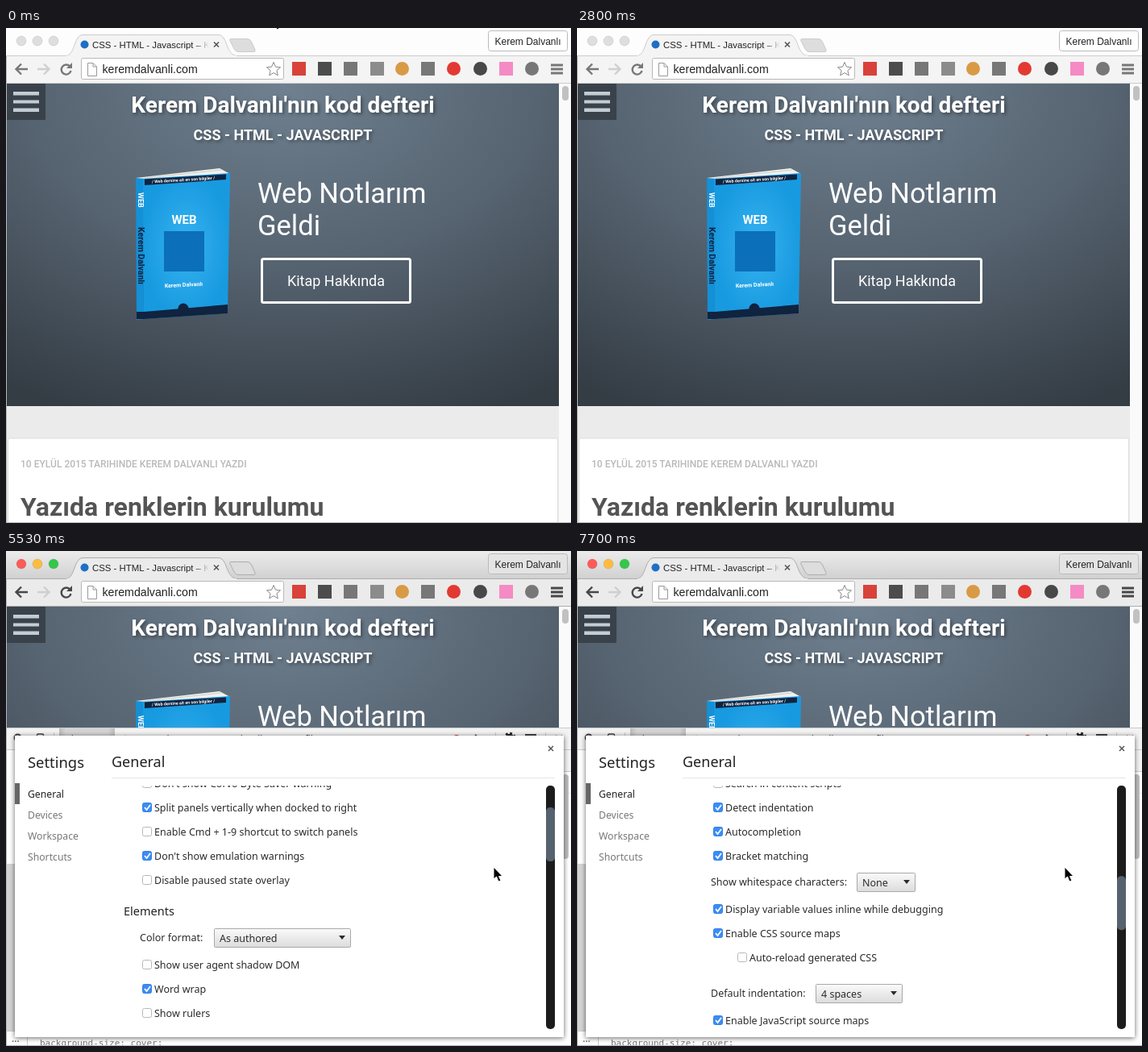
Animation, 701 px wide and 614 px high, one loop 8 s. Source, as an HTML page:

```html
<!DOCTYPE html>
<html lang="tr">
<head>
<meta charset="utf-8">
<title>Settings walkthrough</title>
<style>
html, body { margin: 0; width: 100%; height: 100%; overflow: hidden; background: #fff }
svg { display: block; --dim: #787878; --edge: #ccc; --bar: #f4f4f4; --btn: #fff }
svg.on { --dim: #484848; --edge: #adadad; --bar: #ebebeb; --btn: #e4e4e4 }
svg.on .red { fill: #fc5b57 } svg.on .yel { fill: #fdbc40 } svg.on .grn { fill: #34c84a }
text { white-space: pre }
.ui { font: 12px "Liberation Sans", Arial, sans-serif }
.page { font-family: Roboto, sans-serif; fill: #fff }
.dev { font: 12.2px "Noto Sans", sans-serif; fill: #444 }
.opt { font: 12.5px "Noto Sans", sans-serif; fill: #2b2b2b }
.mono { font: 11px "DejaVu Sans Mono", monospace }
.menu { font: 14.35px "Liberation Sans", Arial, sans-serif; fill: #2a2a2a }
.line { fill: none; stroke: var(--dim); stroke-width: 2.4 }
.shade { filter: drop-shadow(2px 2px 2px #0006) }
</style>
</head>
<body>
<svg id="stage" width="701" height="614" viewBox="0 0 701 614">
<defs>
  <radialGradient id="sky" gradientUnits="userSpaceOnUse" cx="0" cy="0" r="1" gradientTransform="translate(345 72) scale(640 440)">
    <stop stop-color="#6f8090"/><stop offset=".5" stop-color="#566370"/><stop offset="1" stop-color="#343c44"/>
  </radialGradient>
  <radialGradient id="cover"><stop stop-color="#36b2f0"/><stop offset="1" stop-color="#189ae0"/></radialGradient>
  <linearGradient id="strip" x2="0" y2="1"><stop stop-color="#ececec"/><stop offset="1" stop-color="#d0d0d0"/></linearGradient>
  <linearGradient id="glass" gradientUnits="userSpaceOnUse" x1="0" x2="0" y1="400" y2="614">
    <stop stop-color="#b9c2c8"/><stop offset=".32" stop-color="#ced3d6"/><stop offset=".48" stop-color="#e2e4e5"/><stop offset=".51" stop-color="#f5f5f5"/>
  </linearGradient>
  <linearGradient id="fade" gradientUnits="userSpaceOnUse" x1="234" x2="252" y1="0" y2="0">
    <stop stop-color="#222"/><stop offset="1" stop-color="#222" stop-opacity="0"/>
  </linearGradient>
  <linearGradient id="knob" x2="0" y2="1"><stop stop-color="#fafafa"/><stop offset="1" stop-color="#dcdcdc"/></linearGradient>
  <linearGradient id="picked" x2="1" y2="0"><stop stop-color="#bbb"/><stop offset=".12" stop-color="#d4d4d4"/><stop offset=".88" stop-color="#d4d4d4"/><stop offset="1" stop-color="#bbb"/></linearGradient>
  <clipPath id="view"><path d="M140 291H668V593H140Z"/></clipPath>
</defs>

<!-- web page -->
<path fill="#ebebeb" d="M0 69H701V614H0Z"/>
<path fill="url(#sky)" d="M1 69H686V469H1Z"/>
<path fill="#fff" stroke="#dcdcdc" d="M2.5 620V511q0-2 2-2H682.500q2 0 2 2V620"/>
<path fill="#39424b" d="M1 69H49V114H1Z"/>
<path fill="#c3ccd3" d="M9 79H41v4.500H9ZM9 89.500H41v4H9ZM9 99.500H41v4.500H9Z"/>
<g class="page">
  <g class="shade" text-anchor="middle" font-weight="700">
    <text x="343.500" y="105" font-size="28">Kerem Dalvanlı'nın kod defteri</text>
    <text x="343.500" y="139" font-size="18">CSS - HTML - JAVASCRIPT</text>
  </g>
  <text x="312" y="217" font-size="34.500">Web Notlarım</text>
  <text x="312" y="257" font-size="34.500">Geldi</text>
  <rect x="317.500" y="286.500" width="184" height="54" rx="2" fill="none" stroke="#fff" stroke-width="3"/>
  <text x="409.500" y="320" font-size="18" text-anchor="middle">Kitap Hakkında</text>
  <text x="18" y="545" font-size="12" font-weight="500" style="fill:#b9b9b9">10 EYLÜL 2015 TARIHINDE KEREM DALVANLI YAZDI</text>
  <text x="18" y="605" font-size="32" font-weight="700" style="fill:#545454">Yazıda renklerin kurulumu</text>
</g>

<!-- book -->
<path fill="#f1f1ee" d="M161 186L265 174L278 181L169 189Z"/>
<path fill="none" stroke="#bdbdb8" stroke-width=".7" d="M164 187L267 176"/>
<path fill="url(#cover)" d="M169 187L278 180L275 354L171 361Z"/>
<path fill="#1490d6" d="M161 186L170 187L171 361L162 362Z"/>
<path fill="#10233f" d="M172 187.500L273 181.500V188L172 195ZM162 352L171 352L275 343V354L171 361H162Z"/>
<circle cx="220" cy="348" r="6.500" fill="#10233f"/>
<rect x="196" y="252" width="50" height="50" fill="#0b6fba"/>
<g class="page" font-weight="700">
  <text x="181" y="192.500" font-size="5.300" transform="rotate(-3.500 181 192)">/ Web dersine ait en son bilgiler /</text>
  <text x="221" y="243" font-size="15" text-anchor="middle">WEB</text>
  <text x="220.500" y="321" font-size="7" text-anchor="middle" transform="rotate(-3 220 320)">Kerem Dalvanlı</text>
  <text font-size="9" transform="translate(163.500 204) rotate(90)">WEB</text>
  <text font-size="10.500" transform="translate(163.500 247) rotate(90)" style="fill:#10233f">Kerem Dalvanlı</text>
</g>

<!-- element highlight -->
<g id="glow">
  <path fill="#6fa8dc" opacity=".66" d="M1 69H686V219H1Z"/>
  <rect x="3.500" y="77.500" width="238" height="17" fill="#ffffc2" stroke="#9c9c86"/>
  <text class="mono" x="6" y="89"><tspan fill="#881280">div</tspan><tspan fill="#994500">.header-title-wrap</tspan> 685<tspan fill="#888">px ×</tspan> 400<tspan fill="#888">px</tspan></text>
</g>
<path fill="#fafafa" d="M686 69H701V614H686Z"/>
<rect x="690" y="72" width="8" height="18" rx="4" fill="#c1c1c1"/>

<!-- browser frame -->
<path fill="#fdfdfd" d="M0 0H701V35H0Z"/>
<path id="live" fill="url(#strip)" d="M0 0H701V35H0Z"/>
<path style="fill:var(--bar)" d="M0 34H701V68H0Z"/>
<path style="stroke:var(--edge)" fill="none" d="M0 34.500H701M0 68.500H701"/>
<path style="fill:var(--bar);stroke:var(--edge)" d="M74 34.500C80 34 82 29 85 21Q89 8.500 95 8.500H264Q270 8.500 274 21C277 29 280 34 287 34.500"/>
<path style="fill:var(--bar)" d="M75 34H286V36H75Z"/>
<path fill="#ddd" style="stroke:var(--edge)" d="M279 13.500H300Q303 13.500 305 18L309 27Q310 29.500 307 29.500H288Q285 29.500 283 26L278 16Q277 13.500 279 13.500Z"/>
<g fill="#dedede" stroke="#0002" stroke-width=".7"><circle class="red" cx="19" cy="16" r="6"/><circle class="yel" cx="39" cy="16" r="6"/><circle class="grn" cx="59" cy="16" r="6"/></g>
<circle cx="97.500" cy="20.500" r="5" fill="#1f6fc4"/>
<text class="ui" x="107" y="25" fill="url(#fade)" style="font-size:11.400px">CSS - HTML - Javascript – K</text>
<path stroke="#555" stroke-width="1.600" d="M258 17.500l6 6m0-6l-6 6"/>
<rect x="598.500" y="3.500" width="98" height="25" rx="3" style="fill:var(--btn)" stroke="#bbb"/>
<text class="ui" x="647.500" y="21" text-anchor="middle" fill="#222">Kerem Dalvanlı</text>
<path class="line" d="M27 51H13M19 44.500L12.500 51L19 57.500"/>
<path class="line" style="stroke:#cfcfcf" d="M39 51H53M47 44.500L53.500 51L47 57.500"/>
<path class="line" d="M79.500 48A6 6 0 1 0 80.500 53"/><path style="fill:var(--dim)" d="M82 43V50H75Z"/>
<rect x="93.500" y="37.500" width="251" height="26" rx="2" fill="#fff" stroke="#b9b9b9"/>
<path fill="#fff" stroke="#999" d="M101.500 43.500H108L112.500 48V59.500H101.500ZM108 43.500V48H112.500"/>
<text class="ui" x="119.500" y="56" fill="#222" style="font-size:14.200px">keremdalvanli.com</text>
<path fill="#fff" stroke="#888" d="M332 42.500l2.500 5.700 6 .6-4.600 4 1.400 6-5.300-3.200-5.300 3.200 1.400-6-4.600-4 6-.6Z"/>
<g id="icons"></g>
<path class="line" style="stroke-width:2.800" d="M676 46H691M676 51H691M676 56H691"/>

<!-- developer panel -->
<g id="panel">
  <path fill="#fff" d="M0 219H701V614H0Z"/>
  <path fill="#f3f3f3" d="M0 220H701V246H0ZM27 247H701V273H27Z"/>
  <path fill="none" stroke="#cbcbcb" d="M0 219.500H701M0 246.500H701M27 273.500H701M26.500 247V614M0 595.500H26M59.500 225V242M607.500 225V242M669.500 225V242"/>
  <path fill="none" stroke="#ececec" d="M27 300.500H701M11.500 247V595"/>
  <rect x="15" y="250" width="8" height="21" rx="4" fill="#c1c1c1"/>
  <path fill="url(#picked)" d="M66 220H135V246H66Z"/>
  <path fill="#fff" stroke="#cbcbcb" d="M32.500 274V249.500H75.500V274"/>
  <g fill="none" stroke="#444" stroke-width="2"><circle cx="14.500" cy="231.500" r="4"/><path d="M17.500 234.500L22 239"/><rect x="38.500" y="227" width="8" height="13" rx="1.500" stroke-width="1.400"/></g>
  <path fill="#eda522" d="M148 228L153.500 238H142.500Z"/><path stroke="#fff" d="M148 231V235M148 236V237"/>
  <g class="dev" id="tabs"></g>
  <circle cx="559" cy="233" r="5" fill="#d8362e"/><path stroke="#fff" stroke-width="1.300" d="M557 231l4 4m0-4l-4 4"/>
  <path fill="none" stroke="#444" stroke-width="1.800" d="M582 228l6 4.500-6 4.500M589 238H598M682 229l8 8m0-8l-8 8"/>
  <g id="gear" fill="none" stroke="#444"><circle cx="625" cy="233" r="4.500" stroke-width="3.500"/><circle cx="625" cy="233" r="7" stroke-width="2.500" stroke-dasharray="2.750"/></g>
  <path fill="none" stroke="#444" stroke-width="2" d="M645 228H657V238H645ZM654 228V238"/><path fill="#444" d="M662 235V241H656Z"/>
  <path fill="none" stroke="#aaa" stroke-width="1.800" d="M629 287.500H639M634 282.500V292.500M657 282H665M661 288V294M656 288H666"/>
  <path fill="#aaa" d="M658.500 282H663.500V288H658.500ZM678 287L684 281L690 287L684 293Z"/><path fill="#666" d="M645 290V295H640Z"/>
  <g id="styles">
    <path fill="#d4d4d4" d="M1 388H11V595H1Z"/>
    <rect x="690" y="277" width="8" height="105" rx="4" fill="#c1c1c1"/>
    <text class="dev" x="7" y="609">…</text>
  </g>
</g>

<!-- settings sheet -->
<g id="sheet">
  <path fill="#fff" style="filter:drop-shadow(0 1px 3px #0009)" d="M11 229H692V603H11Z"/>
  <path stroke="#555" stroke-width="1.500" d="M673 242l6 6m0-6l-6 6"/>
  <path stroke="#e6e6e6" d="M131 281.500H681"/>
  <path fill="#666" d="M11 288H17V314H11Z"/>
  <g class="dev" id="side"></g>
  <g clip-path="url(#view)"><g class="opt" id="list"></g></g>
  <rect x="670" y="291" width="11" height="302" rx="5" fill="#1c1c1c"/>
  <rect id="thumb" x="670" width="11" height="67" rx="5" fill="#56626e"/>
</g>

<!-- context menu -->
<g id="menu" class="menu">
  <rect x="430" y="400" width="214" height="240" rx="5" fill="url(#glass)" style="filter:drop-shadow(0 2px 5px #0007)"/>
  <path stroke="#0002" stroke-width="2" d="M430 467H644M430 574H644"/>
  <rect id="hover" x="430" width="214" height="19" fill="#3f86f6"/>
  <circle cx="458.500" cy="590" r="8" fill="#dc2f26"/><circle cx="458.500" cy="611" r="8" fill="#e0a046"/>
  <path fill="#333" d="M623 585.500L632 590L623 594.500Z"/>
</g>
<path fill="none" stroke="#b5b5b5" d="M.5 35V614M0 613.500H701"/>
<path id="cursor" fill="#000" stroke="#fff" d="M0 0V15L3.500 12L6 18L9 17L6.500 11.500H11Z"/>
</svg>
<script>
const $ = id => document.getElementById(id);

function add(parent, tag, attrs, text = '') {
  const el = document.createElementNS('http://www.w3.org/2000/svg', tag);
  for (const k in attrs) el.setAttribute(k, attrs[k]);
  el.textContent = text;
  $(parent).append(el);
  return el;
}
const label = (parent, x, y, text, style = '') => add(parent, 'text', { x, y, style }, text);

// toolbar buttons: centre, colour, round
[[363, '#d8423a'], [395, '#4c4c4c'], [427, '#777'], [460, '#8b8b8b'], [491, '#d99a45', 1], [523, '#777'],
 [555, '#e23a32', 1], [588, '#484848', 1], [620, '#f58bc4'], [652, '#777', 1]].forEach(([x, fill, round]) =>
  add('icons', 'rect', { x: x - 8, y: 42, width: 17, height: 17, rx: round ? 8.5 : 0, fill }));

[[74, 'Elements'], [157, 'Network'], [222, 'Sources'], [284, 'Timeline'], [351, 'Profiles'], [411, 'Resources'], [486, '»'], [567, '1']]
  .forEach(([x, s]) => label('tabs', x, 238, s));
[[37, 'Styles'], [81, 'Computed'], [152, 'Event Listeners'], [250, 'DOM Breakpoints'], [362, 'Properties']]
  .forEach(([x, s]) => label('tabs', x, 266, s));
label('tabs', 32, 292, 'Filter', 'fill:#aaa');

['element.style {', '}', '', '.header-title-wrap {', '  position: relative;', '  height: 400px;', '  text-align: center;', '}']
  .forEach((s, i) => add('styles', 'text', { class: 'mono', x: 38, y: 316 + i * 14, fill: '#555' }, s));
add('styles', 'text', { class: 'mono', x: 42, y: 614, fill: '#777' }, 'background-size: cover;');

label('side', 27, 269, 'Settings', 'font-size:18.4px;fill:#222');
label('side', 131, 268, 'General', 'font-size:18px;fill:#222');
['General', 'Devices', 'Workspace', 'Shortcuts'].forEach((s, i) =>
  label('side', 27, 306 + i * 26, s, 'fill:' + (i ? '#777' : '#222')));

function check(y, text, on, x = 169) {
  add('list', 'rect', { x: x + .5, y: y - 5.5, width: 11, height: 11, rx: 2, fill: on ? '#3a8cf6' : '#fff', stroke: on ? '#3480e4' : '#b8b8b8' });
  if (on) add('list', 'path', { d: `M${x + 3} ${y}l2.500 3 4.500-6`, fill: 'none', stroke: '#fff', 'stroke-width': 1.8 });
  label('list', x + 15, y + 4.5, text);
}
const heading = (y, text) => label('list', 146, y + 5, text, 'font-size:14.5px;fill:#222');
function select(y, text, x, width, value) {
  label('list', 166, y + 4, text);
  add('list', 'rect', { x: x + .5, y: y - 11.5, width: width - 1, height: 23, rx: 1, fill: 'url(#knob)', stroke: '#a9a9a9' });
  label('list', x + 7, y + 5, value);
  add('list', 'path', { d: `M${x + width - 15} ${y - 3}h8l-4 5Z` });
}
check(312, 'Disable cache (while DevTools is open)');
check(342, 'Disable JavaScript');
heading(381, 'Appearance');
check(410, "Don't show Corvo Byte Saver warning");
check(440, 'Split panels vertically when docked to right', 1);
check(470, 'Enable Cmd + 1-9 shortcut to switch panels');
check(500, "Don't show emulation warnings", 1);
check(530, 'Disable paused state overlay');
heading(569, 'Elements');
select(602, 'Color format:', 258, 170, 'As authored');
check(635, 'Show user agent shadow DOM');
check(665, 'Word wrap', 1);
check(695, 'Show rulers');
check(725, 'Highlight DOM updates', 1);
heading(764, 'Sources');
check(793, 'Search in content scripts');
check(823, 'Detect indentation', 1);
check(853, 'Autocompletion', 1);
check(883, 'Bracket matching', 1);
select(916, 'Show whitespace characters:', 347, 73, 'None');
check(949, 'Display variable values inline while debugging', 1);
check(979, 'Enable CSS source maps', 1);
check(1009, 'Auto-reload generated CSS', 0, 199);
select(1054, 'Default indentation:', 296, 108, '4 spaces');
check(1087, 'Enable JavaScript source maps', 1);

const items = [[418, 'Geri'], [437, 'İleri', 1], [456, 'Yeniden Yükle'], [487, 'Farklı Kaydet…'], [506, 'Yazdır…'],
  [525, 'Türkçe Diline Çevir'], [544, 'Sayfa Kaynağını Görüntüle'], [563, 'Sayfa Bilgilerini Görüntüle'],
  [595, 'AdFence'], [616, 'Crumb Tools']]
  .map(([y, s, off]) => ({ y, off, el: label('menu', y > 580 ? 471 : 451, y, s) }));

// time, then values
const path = [[70, 330, -16], [560, 430, 400], [980, 430, 400], [1400, 475, 640], [3220, 475, 640], [3290, 553, 600],
  [3500, 580, 464], [3850, 626, 225], [4130, 626, 225], [4200, 627, 226], [4760, 627, 226], [5040, 605, 392]];
const scroll = [[5180, 0], [5320, 14], [5390, 14], [5670, 230], [5880, 300], [6230, 300], [6300, 309], [6370, 318], [6440, 318],
  [6720, 425], [6790, 425], [6860, 432], [7140, 432], [7280, 465], [7350, 465], [7420, 480], [7490, 480], [7560, 493], [7630, 493], [7700, 505]];

function at(keys, t) {
  const i = keys.findIndex(k => k[0] > t);
  if (i < 1) return keys.at(i).slice(1);
  const a = keys[i - 1], b = keys[i], p = (t - a[0]) / (b[0] - a[0]);
  return a.slice(1).map((v, n) => v + (b[n + 1] - v) * p);
}
const show = (id, opacity) => $(id).setAttribute('opacity', +opacity);

function draw(now) {
  const t = Math.floor(now % 8000 / 70) * 70;
  const open = t >= 3290;
  $('stage').setAttribute('class', open ? 'on' : '');
  show('live', open);
  show('panel', open);
  show('glow', open && t < 5460);
  show('styles', t >= 3640);
  show('sheet', t < 4620 ? 0 : t < 4690 ? .6 : 1);
  show('menu', t < 910 ? 0 : t < 2240 ? 1 : Math.max(0, (2380 - t) / 210));
  $('gear').setAttribute('stroke', t >= 4410 ? '#222' : '#444');

  const [x, y] = at(path, t);
  $('cursor').setAttribute('transform', `translate(${x} ${y})`);
  const hit = items.find(m => t >= 1050 && t < 1400 && !m.off && y > m.y - 14 && y < m.y + 5);
  show('hover', !!hit);
  if (hit) $('hover').setAttribute('y', hit.y - 14);
  for (const m of items) m.el.style.fill = m === hit ? '#fff' : m.off ? '#0005' : '';

  const [s] = at(scroll, t);
  $('list').setAttribute('transform', `translate(0 ${-s})`);
  $('thumb').setAttribute('y', 291 + s / 4.5);
}

const start = performance.now();
(function tick() {
  draw(performance.now() - start);
  requestAnimationFrame(tick);
})();
</script>
</body>
</html>
```
